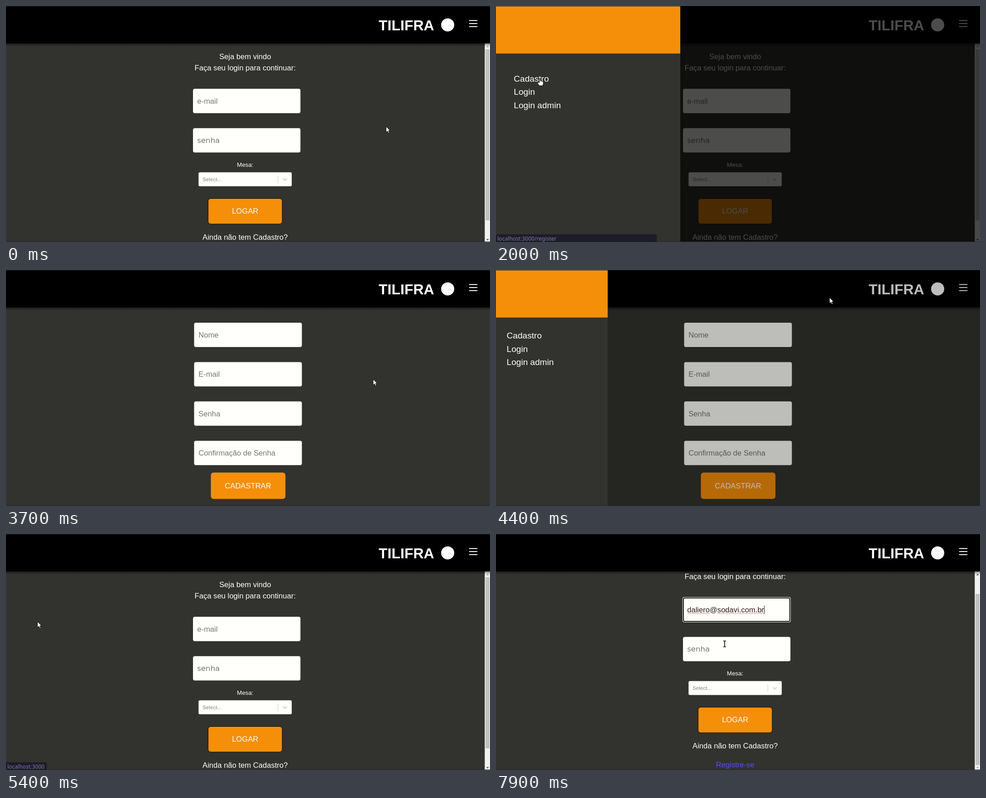
An HTML page that plays this animation: 1069x524 px, repeating every 8000 ms.

```html
<!DOCTYPE html>
<html lang="pt-BR">
<head>
<meta charset="utf-8">
<title>Login</title>
<style>
  html, body { margin: 0; width: 100%; height: 100%; overflow: hidden; background: #32322e; }
  #stage { display: block; width: 100vw; height: 100vh; }
  text { font: 16.6px "Liberation Sans", Arial, sans-serif; fill: #fffffb; white-space: pre; }
  .mid { text-anchor: middle; }
  .hint { fill: #757575; }
  .paper { fill: #fffffb; }
  .orange { fill: #f58f09; }
  .link { font-size: 19.1px; }
  #bubble text { font: 12.1px "Noto Sans", "Open Sans", sans-serif; fill: #7f78b8; }
</style>
</head>
<body>
<svg id="stage" viewBox="0 0 1069 524" preserveAspectRatio="none">
  <defs>
    <linearGradient id="shade" x2="0" y2="1">
      <stop stop-opacity=".5"/><stop offset="1" stop-opacity="0"/>
    </linearGradient>
  </defs>
  <rect width="1069" height="524" fill="#32322e"/>

  <g id="login">
    <g id="scroll">
      <text class="mid" x="528.2" y="117.8">Seja bem vindo</text>
      <text class="mid" x="528.2" y="143.1">Faça seu login para continuar:</text>
      <rect class="paper" x="413" y="183.8" width="237.3" height="54.2" rx="4"/>
      <g id="focus">
        <rect class="paper" x="412" y="182.8" width="239" height="56" rx="4"/>
        <rect x="414" y="184.8" width="235" height="52" rx="2.5" fill="none" stroke="#101010" stroke-width="2"/>
      </g>
      <text id="mailHint" class="hint" x="422.2" y="216.6">e-mail</text>
      <g id="mail">
        <text x="422.2" y="216.6" style="fill:#222">daliero@sodavi.com.br</text>
        <path id="squiggle" fill="none" stroke="#e0403c" stroke-width=".9"/>
      </g>
      <rect id="caret" y="201.8" width="1" height="18.5" fill="#111"/>
      <rect class="paper" x="413" y="271.2" width="237.3" height="54" rx="4"/>
      <text class="hint" x="422.2" y="303.8" style="font-family:'DejaVu Sans',sans-serif">senha</text>
      <text class="mid" x="528.2" y="356.8" style="font-size:13.3px">Mesa:</text>
      <rect class="paper" x="425.3" y="369.3" width="205.8" height="31" rx="3"/>
      <text class="hint" x="434" y="389" style="font-size:11.7px;fill:#808080">Select...</text>
      <path d="M600.5 376.5v17" stroke="#ccc"/>
      <path d="M611.5 383l4.2 4.2 4.2-4.2" fill="none" stroke="#ccc" stroke-width="1.8"/>
      <rect class="orange" x="446.5" y="427.5" width="163.5" height="56.5" rx="6" stroke="#000" stroke-width=".9"/>
      <text class="mid" x="528.2" y="461.2">LOGAR</text>
      <text class="mid" x="528.2" y="518.8">Ainda não tem Cadastro?</text>
      <text class="mid" x="528.2" y="560.8" style="fill:#574ff2">Registre-se</text>
    </g>
    <rect x="1057.4" y="83" width="11.6" height="441" fill="#f1f1f1"/>
    <rect id="thumb" x="1059.2" y="96" width="8.8" height="380" fill="#c1c1c1"/>
    <path id="up" d="M1060.7 91.5h6l-3-3.2z"/>
    <path id="down" d="M1060.7 517.5h6l-3 3.2z"/>
  </g>

  <g id="register"></g>

  <rect y="83" width="1069" height="7" fill="url(#shade)"/>
  <rect width="1069" height="83"/>
  <rect width="1069" height="1" fill="#1f1f1f"/>
  <text x="823" y="53.5" style="font-size:32px;font-weight:bold;fill:#fff">TILIFRA</text>
  <circle cx="975.5" cy="42" r="14.5" fill="#fff"/>
  <path d="M1023.6 32.2h16.8M1023.6 39h16.8M1023.6 45.8h16.8" stroke="#fff" stroke-width="2" stroke-linecap="round"/>

  <rect id="dim" width="1069" height="524"/>
  <svg id="drawer" height="524">
    <rect width="407" height="524" fill="#32322e"/>
    <rect class="orange" y="1" width="407" height="104.5"/>
    <g id="items">
      <text class="link">Cadastro</text>
      <text class="link" y="29.7">Login</text>
      <text class="link" y="59.4">Login admin</text>
    </g>
  </svg>
  <rect y="523" width="1069" height="1" fill="#2c2630"/>

  <g id="bubble">
    <path id="bubbleBox" fill="#1e1c28"/>
    <text x="3" y="520.7"></text>
  </g>

  <g id="pointer">
    <path id="arrow" d="M.5.5V13.6L3.6 10.7 5.7 15.6 7.8 14.7 5.7 9.9H9.5Z" fill="#fff" stroke="#000" stroke-width=".9"/>
    <path id="hand" d="M-1.2 9V1.2Q0-.4 1.2 1.2V5.6Q2.6 4.8 3.4 6 5 5.4 5.7 6.7 7.5 6.3 7.5 8.4V11.5L6 16H-1.2L-5 10.6Q-5.6 8.4-3.4 8.4Z" fill="#fff" stroke="#000" stroke-width=".9"/>
    <path id="beam" d="M-3-6.5h2q1 0 1 1 0-1 1-1h2M0-6V6M-3 6.5h2q1 0 1-1 0 1 1 1h2" fill="none" stroke="#000" stroke-width="1.6"/>
  </g>
</svg>
<script>
const LOOP = 8000;
const $ = id => document.getElementById(id);
const show = (id, on) => $(id).style.display = on ? '' : 'none';
const set = (id, name, value) => $(id).setAttribute(name, value);
const clamp = v => Math.min(1, Math.max(0, v));
const between = (t, a, b) => t >= a && t < b;
const inside = (x, y, l, t, r, b) => x >= l && x <= r && y >= t && y <= b;

// time, x, y, ease-out power of the move that ends there
const path = [
  [300, 839, 267, 1], [1200, 1029, 39, 1.6], [1300, 950, 48, 1], [1400, 766, 75, 1],
  [2000, 97, 161, 1.8], [2500, 97, 161, 1], [3000, 729, 253, 1.4], [3500, 747, 304, 1.3],
  [3600, 747, 304, 1], [3700, 810.5, 242, 1], [4100, 1032, 32, 1.5], [4200, 1032, 32, 1],
  [4300, 960, 40, 1], [4600, 288.5, 102, 1], [5000, 69, 194, 1.8], [5800, 69, 194, 1],
  [5900, 330, 148, 1], [6000, 528.5, 206, 1], [6600, 528.5, 206, 1], [6700, 528.5, 210, 1],
  [6800, 528.5, 210, 1], [7200, 565, 178, 1.5], [7600, 565, 178, 1], [7900, 505, 244, 1]
];

function pointerAt(t) {
  const i = path.findIndex(p => p[0] >= t);
  if (i < 1) return path[i < 0 ? path.length - 1 : 0].slice(1, 3);
  const [t0, x0, y0] = path[i - 1], [t1, x1, y1, power] = path[i];
  const k = 1 - (1 - (t - t0) / (t1 - t0)) ** power;
  return [x0 + (x1 - x0) * k, y0 + (y1 - y0) * k];
}

const fieldTops = [117, 204.4, 291.8, 379.2];
$('register').innerHTML = ['Nome', 'E-mail', 'Senha', 'Confirmação de Senha'].map((label, i) =>
  `<rect class="paper" x="415.5" y="${fieldTops[i]}" width="238" height="54" rx="4"/>
   <text class="hint" x="425.2" y="${fieldTops[i] + 32.8}">${label}</text>`).join('') +
  `<rect class="orange" x="452.5" y="449.8" width="164.7" height="58.4" rx="6"/>
   <text class="mid" x="534.5" y="484.5">CADASTRAR</text>`;

const wave = (x, end) => {
  let d = `M${x} 219.2q1-2 2 0`;
  for (x += 2; x < end; x += 2) d += 't2 0';
  return d;
};
set('squiggle', 'd', wave(422.5, 471) + wave(488.5, 591));

function draw(t) {
  const onRegister = between(t, 2200, 5300);
  show('login', !onRegister);
  show('register', onRegister);

  // drawer
  const opened = between(t, 1300, 2200) ? 1248.5 : between(t, 4300, 5300) ? 4248.5 : Infinity;
  const open = clamp((t - opened) / 250);
  set('drawer', 'width', 407 * open);
  show('drawer', open > 0);
  set('items', 'transform', `translate(${40 * open - .7} ${127.6 + 40 * open})`);
  set('dim', 'opacity', .7 * open * open);

  // scrolling
  const s = clamp((t - 6100) / 400), k = s * s * (3 - 2 * s), shift = 42.8 * k;
  set('scroll', 'transform', `translate(0 ${-shift})`);
  set('thumb', 'y', 96 + 37 * k);
  set('up', 'fill', k > 0 ? '#505050' : '#a3a3a3');
  set('down', 'fill', k < 1 ? '#505050' : '#a3a3a3');

  // e-mail field
  const filled = t >= 7500;
  show('focus', t >= 7100);
  show('caret', t >= 7100);
  set('caret', 'x', filled ? 592 : 422);
  show('mail', filled);
  show('mailHint', !filled);

  // address of the hovered link
  const first = between(t, 1900, 2800);
  show('bubble', first || between(t, 4900, 5900));
  set('bubbleBox', 'd', `M0 507H${first ? 353 : 88}q2 0 2 2V524H0Z`);
  set('bubble', 'opacity', first ? clamp((2900 - t) / 300) : 1);
  $('bubble').lastElementChild.textContent = 'localhost:3000' + (first ? '/register' : '');

  // pointer
  const [x, y] = pointerAt(t);
  const onLink = inside(x, y, 1018, 25, 1045, 52) || open === 1 && inside(x, y, 40, 150, 143, 230);
  const onField = !open && (onRegister
    ? fieldTops.some(top => inside(x, y, 416, top, 653, top + 54))
    : [184, 271.3].some(top => inside(x, y, 413, top - shift, 650, top + 54 - shift)));
  show('hand', onLink);
  show('beam', !onLink && onField);
  show('arrow', !onLink && !onField);
  set('pointer', 'transform', `translate(${x} ${y})`);
}

// the picture changes ten times a second
const start = performance.now();
function tick() {
  const t = (performance.now() - start) % LOOP;
  draw(Math.floor(t / 100) * 100);
  requestAnimationFrame(tick);
}
tick();
</script>
</body>
</html>
```
